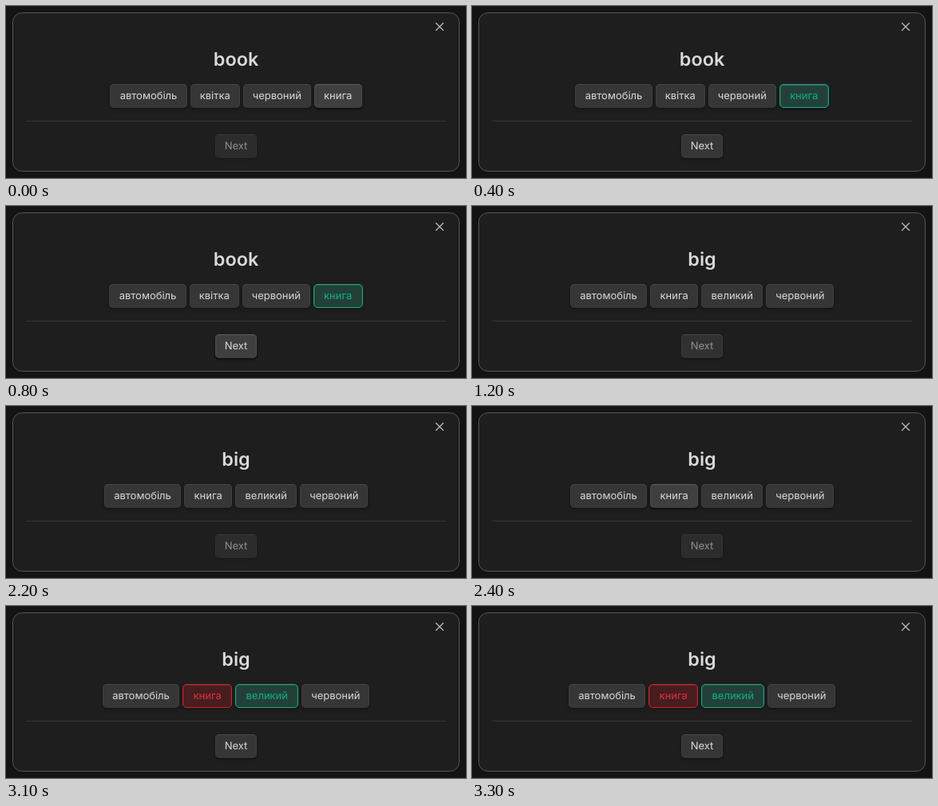
Recreate the animation shown at these times as an HTML page. Size 576 px wide and 216 px high, loop 4.8 s.

```html
<!DOCTYPE html>
<html lang="uk">
<head>
<meta charset="utf-8">
<title>Vocabulary quiz</title>
<style>
html, body { margin: 0; width: 100%; height: 100%; overflow: hidden; background: #131313; }
body { position: relative; font: 13px Inter, sans-serif; color: #dadada; text-rendering: geometricPrecision; }
.modal {
  position: absolute; left: 8px; top: 8px; width: 560px; height: 200px;
  box-sizing: border-box; border: 1px solid #555; border-radius: 12px; background: #1e1e1e;
}
.close { position: absolute; left: 534px; top: 17px; width: 18px; height: 18px; }
h2 {
  position: absolute; left: 0; top: 51px; width: 576px; margin: 0;
  font-size: 23.4px; font-weight: 600; line-height: 32px; text-align: center;
}
.answers {
  position: absolute; left: 0; top: 98px; width: 576px;
  display: flex; justify-content: center; gap: 4px;
}
hr { position: absolute; left: 25px; top: 144px; width: 526px; height: 1px; margin: 0; border: 0; background: #363636; }
.button {
  flex: none; height: 30px; line-height: 30px; box-sizing: border-box; border-radius: 5px;
  display: flex; justify-content: center; white-space: nowrap; background: #363636;
  box-shadow: inset 0 .5px .5px .5px rgba(255,255,255,.09), 0 2px 4px rgba(0,0,0,.15),
    0 1px 1.5px rgba(0,0,0,.1), 0 1px 2px rgba(0,0,0,.2);
}
.hover {
  background: #3f3f3f;
  box-shadow: inset 0 .5px 1px .5px rgba(255,255,255,.16), 0 2px 3px rgba(0,0,0,.3),
    0 1px 1.5px rgba(0,0,0,.2), 0 1px 2px rgba(0,0,0,.4);
}
.right, .wrong { border: 1px solid; line-height: 28px; }
.right { color: #10b17c; background: #234038; }
.wrong { color: #de323a; border-color: #d82027; background: #471d20; }
.next { position: absolute; left: 262px; top: 161px; width: 52px; }
.disabled { opacity: .6; }
</style>
</head>
<body>
<div class="modal"></div>
<svg class="close" viewBox="0 0 24 24" fill="none" stroke="#bababa" stroke-width="1.75" stroke-linecap="round">
  <path d="M18 6 6 18M6 6l12 12"/>
</svg>
<h2></h2>
<div class="answers"></div>
<hr>
<div class="button next">Next</div>
<script>
const LOOP = 4800;
const widths = { автомобіль: 96.5, квітка: 62, червоний: 85, книга: 60, великий: 77 };
const questions = [
  { word: 'book', answers: ['автомобіль', 'квітка', 'червоний', 'книга'], right: 'книга' },
  { word: 'big', answers: ['автомобіль', 'книга', 'великий', 'червоний'], right: 'великий' }
];
const steps = [
  { at: 0, question: 0, hover: 'книга' },
  { at: 400, question: 0, hover: 'книга', picked: 'книга' },
  { at: 600, question: 0, picked: 'книга' },
  { at: 800, question: 0, hover: 'Next', picked: 'книга' },
  { at: 1200, question: 1, hover: 'Next' },
  { at: 2200, question: 1 },
  { at: 2400, question: 1, hover: 'книга' },
  { at: 2700, question: 1, hover: 'книга', picked: 'книга' },
  { at: 3100, question: 1, picked: 'книга' }
];

const title = document.querySelector('h2');
const answers = document.querySelector('.answers');
const next = document.querySelector('.next');

function answerButton(text, step, right) {
  const button = document.createElement('div');
  const mark = !step.picked ? '' : text === right ? 'right' : text === step.picked ? 'wrong' : '';
  button.className = `button ${step.hover === text ? 'hover' : ''} ${mark}`;
  button.style.width = widths[text] + (mark ? 2 : 0) + 'px';
  button.textContent = text;
  return button;
}

function show(step) {
  const { word, answers: list, right } = questions[step.question];
  title.textContent = word;
  answers.replaceChildren(...list.map(text => answerButton(text, step, right)));
  next.classList.toggle('hover', step.hover === 'Next');
  next.classList.toggle('disabled', !step.picked);
}

const start = performance.now();
let current;

function tick() {
  const time = (performance.now() - start) % LOOP;
  const step = steps.findLast(s => s.at <= time);
  if (step !== current) show(current = step);
  requestAnimationFrame(tick);
}
tick();
</script>
</body>
</html>
```
